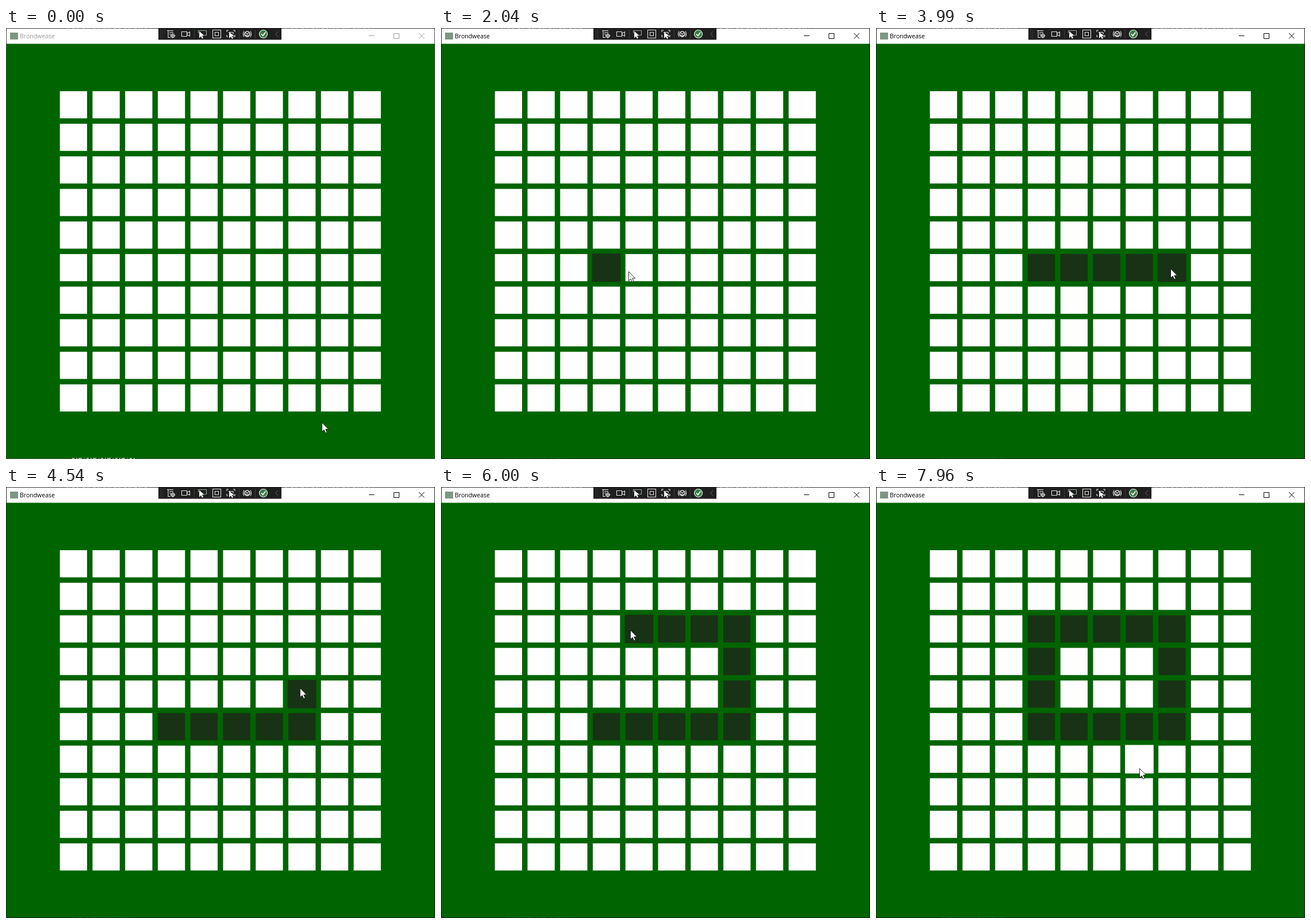
An HTML page that plays this animation: 746x751 px, repeating every 8000 ms.

```html
<!DOCTYPE html>
<html lang="en">
<head>
<meta charset="utf-8">
<title>Brondwease</title>
<style>
  html, body { margin: 0; width: 100%; height: 100%; overflow: hidden; background: #006400; }
  svg { display: block; width: 100%; height: 100%; }
  text { font: 10.5px "Open Sans", "Noto Sans", sans-serif; }
  #bar { --ink: #999; }
  #bar.active { --ink: #000; }
  #bar text { fill: var(--ink); }
  #bar path { fill: none; stroke: var(--ink); }
  .tool { fill: none; stroke: #e4e4e4; stroke-width: 1.1; }
  .arrow { fill: #f4f4f4; stroke: none; }
</style>
</head>
<body>
<svg viewBox="0 0 746 751">
  <rect width="746" height="751" fill="#006400"/>
  <g id="bar">
    <rect width="746" height="27.5" fill="#fff"/>
    <rect x="7" y="8" width="14" height="12" fill="#7d9784"/>
    <text x="24" y="18">Brondwease</text>
    <path d="M631 13.5h9.5M674.5 9.5h9v9h-9zM718 9l9.5 9.5M727.5 9l-9.5 9.5"/>
  </g>
  <path id="edge" d="M.5 0V750.5H745.5V0" fill="none"/>
  <path d="M0 .5H746" stroke="#333"/>
  <path d="M105 .5H245M485 .5H640" stroke="#777" stroke-dasharray="3 2 1 4 5 3"/>
  <path id="under" d="M115 750H225" stroke="#b8c4b8" stroke-dasharray="4 3 2 2 6 4 1 3"/>

  <rect x="265" y="0" width="214" height="20.5" fill="#1f1f1f"/>
  <path d="M269.5 3V18M272.5 4V18" stroke="#555" stroke-dasharray="1 2"/>
  <path d="M327.5 3V18M405.5 3V18M433.5 3V18" stroke="#3d3d3d"/>
  <g class="tool">
    <path d="M280 4.5H291M282 4.5V16.5H286M284 7.5H291M284 10.5H287"/>
    <circle cx="290" cy="13.5" r="3"/>
    <path d="M290 9V18M285.5 13.5H294.5"/>
    <path d="M305.5 6.5h9v8h-9zM314.5 9.5l5 -2.5v7l-5 -2.5"/>
    <path d="M338 4.5H348.5V12.5H345M334.5 9V4.5H338" stroke="#8fa88f"/>
    <path class="arrow" d="M336 5.5v12l3 -3 2 4 2 -1 -2 -4h4z"/>
    <path d="M359.5 3.5h14v14h-14zM363.5 7.5h6v6h-6z"/>
    <path d="M384 7V4H387M395 4H398V7M384 12V15H386M395 15H398V12M387 7.5H395V11"/>
    <path class="arrow" d="M388 7v11l3 -3 2 4 2 -1 -2 -4h4z"/>
    <circle cx="419.5" cy="10.5" r="4.5" stroke-width="1.6"/>
    <path d="M414 5.5q-3 5 0 10M425 5.5q3 5 0 10M416.5 8l3 3 3 -3M416.5 12l3 2 3 -2"/>
  </g>
  <circle cx="447.5" cy="10.5" r="7" fill="#397d43" stroke="#e3eee3" stroke-width="1.2"/>
  <path d="M444 10.5l2.7 3 4.5 -6" fill="none" stroke="#fff" stroke-width="1.8"/>
  <path d="M473 6l-4.5 4.5 4.5 4.5" fill="none" stroke="#666"/>

  <g id="cells"></g>
  <path id="pointer" d="M0 0V16L3.7 12.6 6.3 18.2 8.8 17.1 6.3 11.6H11.3Z"
        fill="#fff" stroke="#111" stroke-width=".9" stroke-linejoin="round"/>
</svg>
<script>
const LOOP = 8000, PRESS = 1920, RELEASE = 6950;
const SIZE = 47.3, PITCH = 56.76, LEFT = 93.7, TOP = 110.1, INSET = 2;
const GROW = 0.05, LAG = 30, FADE = 8, PAINT_DELAY = 100;

// time, x, y of the pointer tip where it turns or rests
const stops = [
  [130, 549, 687], [920, 402, 374], [1250, 310, 449], [1380, 290, 418],
  [1530, 290, 418], [1620, 308, 423], [2000, 308, 423], [2040, 326, 424],
  [2260, 345, 422], [2490, 345, 422], [2850, 400, 424], [3140, 445, 386],
  [3260, 449, 383], [3400, 456, 412], [3980, 512, 420], [4110, 513, 376],
  [4540, 511, 350], [4930, 512, 264], [6000, 329, 249], [6200, 290, 250],
  [6790, 293, 346], [7050, 298, 364], [7390, 436, 456], [7960, 458, 490]
];

const clamp = v => Math.min(1, Math.max(0, v));
const ease = k => k * k * (3 - 2 * k);

function tip(t) {
  const next = stops.findIndex(s => s[0] > t);
  const i = next < 0 ? stops.length - 1 : Math.max(1, next);
  const [t0, x0, y0] = stops[i - 1], [t1, x1, y1] = stops[i];
  const k = ease(clamp((t - t0) / (t1 - t0)));
  return [x0 + (x1 - x0) * k, y0 + (y1 - y0) * k];
}

// index of the cell under the pointer, or -1
function cellAt(t) {
  const [x, y] = tip(t);
  const c = Math.floor((x - LEFT) / PITCH), r = Math.floor((y - TOP) / PITCH);
  const inside = d => d > INSET && d < SIZE - INSET;
  const onGrid = c >= 0 && c < 10 && r >= 0 && r < 10;
  return onGrid && inside(x - LEFT - c * PITCH) && inside(y - TOP - r * PITCH)
    ? r * 10 + c : -1;
}

const $ = id => document.getElementById(id);
const set = (el, attrs) => {
  for (const k in attrs) el.setAttribute(k, attrs[k]);
};

const cells = Array.from({ length: 100 }, () =>
  $("cells").appendChild(document.createElementNS("http://www.w3.org/2000/svg", "rect")));

// while the button is down, each cell turns dark shortly after it is entered
const paintedAt = new Map();
for (let t = PRESS; t < RELEASE; t += 10) {
  const i = cellAt(t - PAINT_DELAY);
  if (i >= 0 && !paintedAt.has(i)) paintedAt.set(i, t);
}

function draw(t) {
  const hover = new Array(100).fill(0);
  for (let k = 0; k < FADE; k++) {
    const i = cellAt(t - LAG - k * 10);
    if (i >= 0) hover[i] += 1 / FADE;
  }
  cells.forEach((el, i) => {
    const extra = SIZE * GROW * hover[i];
    set(el, {
      x: LEFT + i % 10 * PITCH - extra / 2,
      y: TOP + Math.floor(i / 10) * PITCH - extra / 2,
      width: SIZE + extra,
      height: SIZE + extra,
      fill: t >= paintedAt.get(i) ? "#183216" : "#fff"
    });
  });
  const active = t >= PRESS;
  $("bar").classList.toggle("active", active);
  set($("edge"), { stroke: active ? "#152515" : "#3c553c" });
  set($("under"), { "stroke-width": active ? 1 : 2, opacity: active ? 0.15 : 0.8 });
  const [x, y] = tip(t);
  set($("pointer"), { transform: `translate(${x + 0.4} ${y + 0.5})` });
}

const start = performance.now();
function tick() {
  draw((performance.now() - start) % LOOP);
  requestAnimationFrame(tick);
}
draw(0);
requestAnimationFrame(tick);
</script>
</body>
</html>
```
